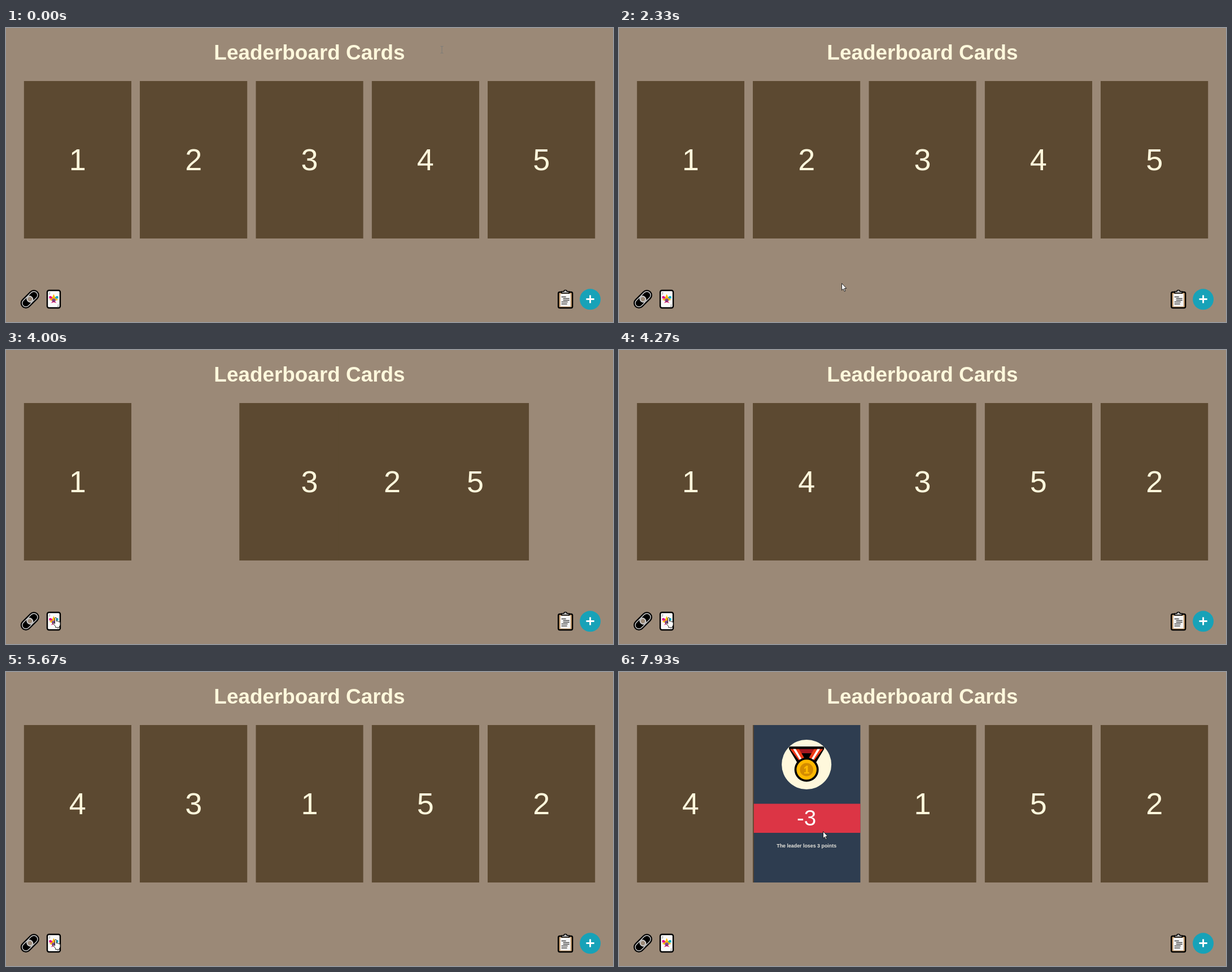
An HTML page that plays this animation: 1075 px wide and 521 px high, repeating every 8 s.

```html
<!DOCTYPE html>
<html lang="en">
<head>
<meta charset="utf-8">
<title>Leaderboard Cards</title>
<style>
  html, body { margin: 0; height: 100%; overflow: hidden; background: #9b8977; }
  svg { display: block; }
  text { font-family: "Liberation Sans", Arial, sans-serif; text-anchor: middle; fill: #fff8dc; }
  .title { font-size: 36.9px; font-weight: bold; }
  .number { font-size: 54px; }
  .score { font-size: 38.5px; fill: #fff; }
  .note { font-size: 8.87px; font-weight: bold; fill: #e6e4dc; }
  .corner { font-size: 5px; fill: #555; }
</style>
</head>
<body>
<svg id="stage" width="100%" height="100%" viewBox="0 0 1075 521">
  <defs>
    <g id="ribbon">
      <path d="M66 42.5H82L95 65L85 67Z" fill="#f03a17"/>
      <path d="M71.5 42.5H76L89.5 65L86 66Z" fill="#fff"/>
    </g>
    <g id="back">
      <rect width="191" height="279" fill="#2e3d50"/>
      <circle cx="95.2" cy="70" r="44" fill="#fff8dc"/>
      <path d="M66 38H124.500Q127.500 39 126 43L111 68H79.500L64.500 43Q63 39 66 38Z"/>
      <path d="M82 42.500H108.500L104.500 50H86Z" fill="#a4161f"/>
      <use href="#ribbon"/>
      <use href="#ribbon" transform="matrix(-1 0 0 1 190.4 0)"/>
      <circle cx="95.200" cy="79" r="21.500"/>
      <circle cx="95.200" cy="79" r="17.800" fill="#ffb900"/>
      <circle cx="95.200" cy="79" r="11.800" fill="#d48c00"/>
      <path d="M91 75.500L95 72H97.500V83.500H100V86H91V83.500H94V76L91 78Z" fill="#ffb900"/>
      <rect y="139.500" width="191" height="51.500" fill="#dc3545"/>
      <text class="score" x="95.200" y="178">-3</text>
      <text class="note" x="95.200" y="217">The leader loses 3 points</text>
    </g>
  </defs>

  <rect width="1075" height="521" fill="#9b8977"/>
  <text class="title" x="537.5" y="56">Leaderboard Cards</text>
  <g id="cards"></g>

  <!-- chain link -->
  <g transform="translate(42.3 480.5) rotate(-45)" fill="none" stroke="#d2d2d2" stroke-width="1.4">
    <rect x="-19.500" y="-9.500" width="39" height="19" rx="9.500" fill="#000" stroke="none"/>
    <rect x="-16.500" y="-6.500" width="21.500" height="13" rx="6.500"/>
    <rect x="-5" y="-6.500" width="21.500" height="13" rx="6.500"/>
    <circle r="4.500" fill="#9b8977"/>
  </g>

  <!-- joker card -->
  <g transform="translate(84.5 480.5)">
    <rect x="-11.500" y="-15.500" width="23" height="31" rx="3" fill="#fafafa" stroke="#000" stroke-width="2.400"/>
    <text class="corner" x="-7.500" y="-9">J</text>
    <text class="corner" x="7.500" y="13">J</text>
    <path d="M-8-5Q-4-7-2-2L-4 2Q-5-2-8-1Z" fill="#e3008c"/>
    <path d="M8-5Q4-7 2-2L4 2Q5-2 8-1Z" fill="#00a9c7"/>
    <path d="M0-9L3-2L8 1L3 3H-3L-8 1L-3-2Z" fill="#ffb900"/>
    <circle cy="2" r="3.300" fill="#8b4ea5"/>
    <path d="M-5 7L-2 4H2L5 7L0 5.500Z" fill="#d01c6c"/>
    <path d="M-1.800 1.500H-.6M.6 1.500H1.800M-1.300 3.500H1.300" stroke="#222" stroke-width=".8"/>
  </g>

  <!-- clipboard -->
  <g transform="translate(990.7 481)">
    <rect x="-12.500" y="-13" width="25" height="28" rx="2.500" fill="#c39a6b" stroke="#000" stroke-width="2.400"/>
    <rect x="-9" y="-10" width="18" height="22.500" fill="#f5f5f5"/>
    <path d="M-6.500-11V-14H-3Q-2.500-16.500 0-16.500T3-14H6.500V-11Z" fill="#bbb" stroke="#000" stroke-width="1.600"/>
    <path d="M-7-4.500H1M-4-1.500H7M-4 1.500H7M-7 4.500H4M-7 8H3" stroke="#444" stroke-width="1.400"/>
  </g>

  <circle cx="1034.600" cy="480.800" r="18.500" fill="#17a2b8"/>
  <path d="M1027.500 480.500h14.200M1034.600 473.400v14.200" stroke="#fff" stroke-width="2.900"/>

  <g id="cursor" stroke-linejoin="round">
    <path data-kind="text" d="M-2.500-5.500H-.6L0-5L.6-5.500H2.500M0-5V6M-2.500 6.500H-.6L0 6L.6 6.500H2.500" fill="none" stroke="#7b7b78"/>
    <path data-kind="arrow" d="M.5.500V12.800L3.300 10.200L5.200 14.800L7 14L5.100 9.500H8.800Z" fill="#fff" stroke="#111" stroke-width=".9"/>
    <path data-kind="hand" d="M-1.500 11V1.500a1.400 1.400 0 0 1 2.800 0V6.500q2.200-1 2.600.7q2-.6 2.300.8q1.800-.3 1.800 1.200v3.300q0 2-1.300 3.200v2h-7v-2L-4.600 10.600q-.6-1.800 1-1.600z" fill="#fff" stroke="#111" stroke-width=".9"/>
  </g>
</svg>
<script>
const LOOP = 8000, STEP = 1000 / 15;
const CARD = { w: 190.5, h: 279, top: 94 };
const FLIP_START = 7572, MOVE_TIME = 400, FLIPPED = 1;

// Card order from each start time on
const orders = [
  { start: -MOVE_TIME, cards: [1, 2, 3, 4, 5] },
  { start: 3862, cards: [1, 4, 3, 5, 2] },
  { start: 5258, cards: [4, 3, 1, 5, 2] }
];

const linear = p => p;
const smooth = p => p * p * (3 - 2 * p);
const easeIn = p => p ** 2.5;
const easeOut = p => 1 - (1 - p) ** 2;

// Pointer stops: time, x, y, easing on the way there
const stops = [
  [800, 772, 38, linear],
  [1667, 597, 352, smooth],
  [2333, 394, 452, easeIn],
  [2533, 169, 441, linear],
  [2933, 88, 473, easeOut],
  [3120, 88, 473, linear],
  [3130, 88, 474, linear],
  [6333, 88, 474, linear],
  [7133, 361, 282, smooth]
];

const slot = i => 31.6 + 205.35 * i;
const lerp = (a, b, p) => a + (b - a) * p;
const progress = (t, start, length) => Math.min(1, Math.max(0, (t - start) / length));

const views = orders[0].cards.map((_, i) => {
  const holder = document.getElementById("cards");
  holder.insertAdjacentHTML("beforeend", `
    <svg y="${CARD.top}" width="${CARD.w}" height="${CARD.h}">
      ${i === FLIPPED ? '<use href="#back"/>' : ""}
      <g><rect width="${CARD.w}" height="${CARD.h}" fill="#5c4931"/>
      <text class="number" x="${CARD.w / 2}" y="158"></text></g>
    </svg>`);
  const box = holder.lastElementChild;
  return { box, front: box.querySelector("g"), label: box.querySelector("text"), back: box.querySelector("use") };
});
const cursor = document.getElementById("cursor");

function pointerAt(t) {
  const next = stops.findIndex(s => s[0] > t);
  if (next === 0) return stops[0].slice(1, 3);
  if (next < 0) return stops[stops.length - 1].slice(1, 3);
  const [t0, x0, y0] = stops[next - 1], [t1, x1, y1, ease] = stops[next];
  const p = ease(progress(t, t0, t1 - t0));
  return [lerp(x0, x1, p), lerp(y0, y1, p)];
}

function pointerKind(x, y, shift) {
  if (y > 24 && y < 60) return "text";
  const onCard = y >= CARD.top && y < CARD.top + CARD.h && views.some((_, i) => {
    const right = slot(i) + CARD.w - (i === FLIPPED ? shift : 0);
    return x >= slot(i) && x < right;
  });
  const onButton = x >= 72 && x < 98 && y >= 463 && y < 498;
  return onCard || onButton ? "hand" : "arrow";
}

function draw(t) {
  const phase = orders.findLastIndex(o => o.start <= t);
  const { start, cards } = orders[phase];
  const before = orders[Math.max(0, phase - 1)].cards;
  const moved = easeOut(progress(t, start, MOVE_TIME));
  const shift = CARD.w * easeOut(progress(t, FLIP_START, MOVE_TIME));

  views.forEach((view, i) => {
    view.box.setAttribute("x", lerp(slot(before.indexOf(cards[i])), slot(i), moved));
    view.label.textContent = cards[i];
    if (view.back) {
      view.back.style.display = shift ? "" : "none";
      view.front.setAttribute("transform", `translate(${-shift})`);
    }
  });

  const [x, y] = pointerAt(t);
  const kind = pointerKind(x, y, shift);
  cursor.setAttribute("transform", `translate(${Math.round(x)} ${Math.round(y)})`);
  for (const shape of cursor.children) shape.style.display = shape.dataset.kind === kind ? "" : "none";
}

// The picture advances at 15 steps per second
const begin = performance.now();
function tick() {
  const t = (performance.now() - begin) % LOOP;
  draw(Math.min(LOOP / STEP - 1, Math.floor((t + 3.4) / STEP)) * STEP);
  requestAnimationFrame(tick);
}
tick();
</script>
</body>
</html>
```
